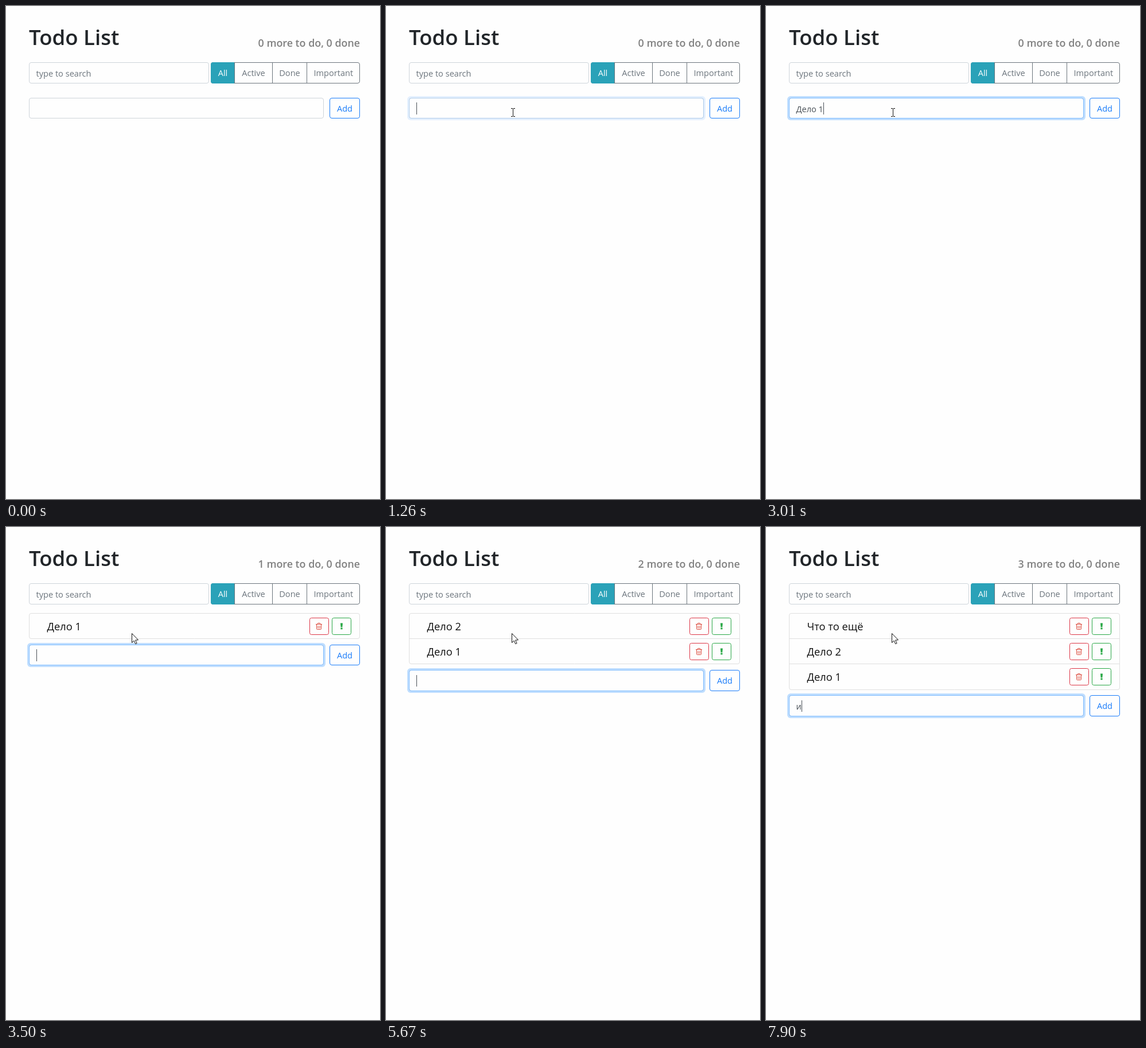
Write an HTML page with a canvas that moves like this. It is 652 px wide and 859 px high and loops after 8 s.

```html
<!DOCTYPE html>
<html lang="en">
<head>
<meta charset="utf-8">
<title>Todo List</title>
<style>
  html, body { margin: 0; width: 100%; height: 100%; overflow: hidden; background: #fefefe; }
  canvas { display: block; }
</style>
</head>
<body>
<canvas id="stage" width="652" height="859"></canvas>
<script>
const ctx = document.getElementById('stage').getContext('2d');
const LOOP = 8000;
const FAMILY = '"Open Sans", "Noto Sans", sans-serif';
const BODY = 14.6, PITCH = 44.2, FIELD = 36.5;
const PAPER = '#fefefe', GREY = '#6c757d', TEAL = '#2aa2b8', BLUE = '#1a7cf9',
      RED = '#dc3545', GREEN = '#28a745', EDGE = '#ced4da';

// Time and content of the entry field after each key; Enter moves it to the list.
const keys = [
  [2060, 'Д'], [2340, 'Де'], [2460, 'Дел'], [2640, 'Дело'], [2700, 'Дело '], [3010, 'Дело 1'],
  [3500, ''],
  [4000, 'Д'], [4210, 'Де'], [4330, 'Дел'], [4510, 'Дело'], [4630, 'Дело '], [5070, 'Дело 2'],
  [5610, ''],
  [6230, 'Ч'], [6330, 'Чт'], [6420, 'Что'], [6520, 'Что '], [6610, 'Что т'], [6710, 'Что то '],
  [6940, 'Что то е'], [7120, 'Что то ещ'], [7360, 'Что то ещё'],
  [7650, ''], [7900, 'и']
];

const clamp = v => Math.max(0, Math.min(1, v));

function stateAt(t) {
  let value = '';
  const items = [];
  for (const [time, next] of keys) {
    if (t < time) break;
    if (next === '') items.unshift(value);
    value = next;
  }
  return { value, items };
}

function text(str, x, y, color, { size = BODY, weight = 400, align = 'left' } = {}) {
  ctx.font = `${weight} ${size}px ${FAMILY}`;
  ctx.textAlign = align;
  ctx.fillStyle = color;
  ctx.fillText(str, x, y);
  return ctx.measureText(str).width;
}

function box(x, y, w, h, stroke, fill, r = 3.5) {
  ctx.beginPath();
  ctx.roundRect(x + 0.5, y + 0.5, w - 1, h - 1, r);
  if (fill) {
    ctx.fillStyle = fill;
    ctx.fill();
  }
  ctx.lineWidth = 1;
  ctx.strokeStyle = stroke;
  ctx.stroke();
}

function rect(x, y, w, h, color) {
  ctx.fillStyle = color;
  ctx.fillRect(x, y, w, h);
}

function header(count) {
  text('Todo List', 40, 68, '#212529', { size: 36.6, weight: 600 });
  text(`${count} more to do, 0 done`, 617, 71, '#808080', { size: 17.85, weight: 600, align: 'right' });
}

function filters() {
  box(40, 98, 314, 37, EDGE);
  text('type to search', 52.5, 123, GREY);
  box(357, 98, 260, 37, GREY);
  ctx.beginPath();
  ctx.roundRect(357, 98, 41, 37, [4, 0, 0, 4]);
  ctx.fillStyle = TEAL;
  ctx.fill();
  for (const x of [398, 464, 524]) rect(x, 98, 1, 37, GREY);
  const label = (str, x, color) => text(str, x, 122, color, { align: 'center' });
  label('All', 378, '#fff');
  label('Active', 431.5, GREY);
  label('Done', 494.5, GREY);
  label('Important', 570.8, GREY);
}

function trash(x, y) {
  const color = '#dc4b3e';
  rect(x - 5, y - 4, 11, 1, color);
  ctx.strokeStyle = color;
  ctx.lineWidth = 1;
  ctx.beginPath();
  ctx.moveTo(x - 2, y - 4);
  ctx.lineTo(x - 1.3, y - 5.5);
  ctx.lineTo(x + 2.3, y - 5.5);
  ctx.lineTo(x + 3, y - 4);
  ctx.moveTo(x - 3.5, y - 3);
  ctx.lineTo(x - 3.5, y + 4.5);
  ctx.quadraticCurveTo(x - 3.5, y + 5.5, x - 2.5, y + 5.5);
  ctx.lineTo(x + 3.5, y + 5.5);
  ctx.quadraticCurveTo(x + 4.5, y + 5.5, x + 4.5, y + 4.5);
  ctx.lineTo(x + 4.5, y - 3);
  ctx.stroke();
  ctx.globalAlpha = 0.75;
  for (const dx of [-2, 0, 2]) rect(x + dx, y - 1, 1, 5, color);
  ctx.globalAlpha = 1;
}

function bang(x, y) {
  ctx.fillStyle = GREEN;
  ctx.beginPath();
  ctx.moveTo(x - 2, y - 5.5);
  ctx.lineTo(x + 2, y - 5.5);
  ctx.lineTo(x + 1.4, y + 1.5);
  ctx.lineTo(x - 1.4, y + 1.5);
  ctx.fill();
  ctx.fillRect(x - 1.6, y + 2.5, 3.2, 2.8);
}

function list(items) {
  if (!items.length) return;
  const top = i => Math.round(150 + i * PITCH);
  box(40, 150, 577, top(items.length) - 149, '#dfdfdf');
  items.forEach((item, i) => {
    const y = top(i);
    if (i) rect(41, y, 575, 1, '#dfdfdf');
    text(item, 71.5, y + 30, '#111', { size: 18.3 });
    box(529, y + 8, 34, 30, RED, null, 3);
    trash(545, y + 23);
    box(568, y + 8, 34, 30, GREEN, null, 3);
    bang(585, y + 23);
  });
}

function entry(t, value, count) {
  // An empty list leaves a gap of one margin above the field.
  const top = count ? 160.6 + count * PITCH : 159.8;
  const y = Math.round(top);
  const h = Math.round(top + FIELD) - y;
  const focus = clamp((t - 1190) / 170);
  if (focus) {
    ctx.beginPath();
    ctx.roundRect(37, y - 3, 520, h + 6, 6);
    ctx.fillStyle = `rgba(0,123,255,${0.25 * focus})`;
    ctx.fill();
  }
  box(40, y, 514, h, EDGE, PAPER);
  ctx.globalAlpha = focus;
  box(40, y, 514, h, '#80bdff');
  ctx.globalAlpha = 1;

  const width = text(value, 52.5, y + 25, '#495057');
  const caretOn = t >= 1210 && (t < 1750 || t >= 2060);
  if (caretOn) {
    const head = Math.round(top + 8.6);
    rect(Math.round(52.9 + width), head, 1, Math.round(top + 29) - head, '#495057');
  }
  box(564, y, 53, h, BLUE);
  text('Add', 590.5, y + 24, BLUE, { align: 'center' });
}

function arrow(x, y) {
  const outline = [[0, 0], [0, 16], [3.7, 12.6], [6.2, 18.2], [8.6, 17.2], [6.2, 11.6], [11, 11.3]];
  ctx.beginPath();
  outline.forEach(([dx, dy]) => ctx.lineTo(x + 0.5 + dx, y + 0.5 + dy));
  ctx.closePath();
  ctx.fillStyle = '#fff';
  ctx.fill();
  ctx.lineWidth = 1;
  ctx.strokeStyle = '#111';
  ctx.stroke();
}

function beam(x, y) {
  const color = '#111';
  rect(x, y - 6, 1, 13, color);
  for (const dy of [-7, 7]) {
    rect(x - 3, y + dy, 3, 1, color);
    rect(x + 1, y + dy, 3, 1, color);
  }
}

function pointer(t) {
  if (t < 290) return;
  if (t < 1100) {
    const step = 750 / 13;
    const p = clamp(Math.floor((t - 290) / step + 0.01) * step / 750);
    arrow(Math.round(225 + 343 * (1 - p) ** 1.245), Math.round(196 + 593 * (1 - p) ** 1.164));
  } else if (t < 3500) {
    const p = t < 1160 ? 0 : t < 1210 ? 0.6 : 1;
    beam(Math.round(224 - 3 * p), Math.round(191 - 6 * p));
  } else {
    arrow(219, 185);
  }
}

function draw(t) {
  const { value, items } = stateAt(t);
  rect(0, 0, 652, 859, PAPER);
  header(items.length);
  filters();
  list(items);
  entry(t, value, items.length);
  pointer(t);
}

let start;
function tick(now) {
  if (start === undefined) start = now;
  draw((now - start) % LOOP);
  requestAnimationFrame(tick);
}
draw(0);
requestAnimationFrame(tick);
</script>
</body>
</html>
```
